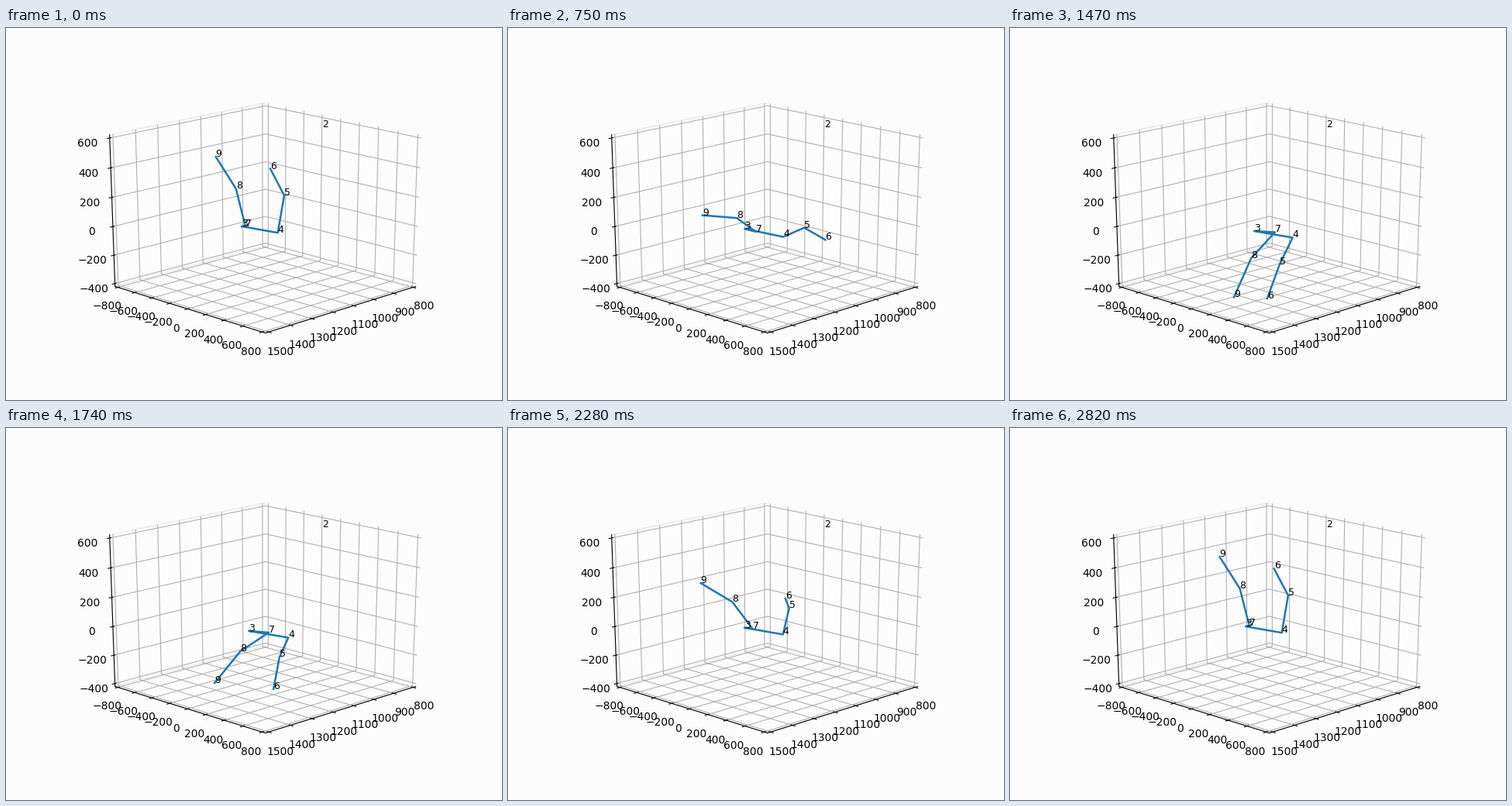
Recreate the animation shown at these times as a matplotlib script. Size 640x480 px, loop 2.85 s.

```python
import numpy as np
import matplotlib.pyplot as plt
from matplotlib.animation import FuncAnimation
from matplotlib.lines import Line2D
from matplotlib.transforms import Affine2D

W, H, DPI = 640, 480, 100
FRAMES, INTERVAL = 95, 30
PAPER = "#fcfcfc"

plt.rcParams["font.family"] = "DejaVu Sans"
plt.rcParams["axes3d.automargin"] = True

# Each joint, as x + yj on screen with y down:
# raised position, way to the lowered one, bulge of the arc,
# gap between the downward and the upward arc.
JOINTS = {
    6: (341 + 181.5j, -8 + 168j, 56 + 21j, 18 + 3j),
    5: (359 + 216j, -10.5 + 89j, 20.5 + 4j, 8 + 1.5j),
    4: (350.7 + 264.2j, 13.8 + 6.3j, 0.5 + 2.4j, -1.9 + 0.4j),
    3: (304 + 256j, 11 + 6j, -2.4 + 0.9j, -0.8 - 0.3j),
    7: (308.8 + 255.5j, 33 + 8j, -0.8 + 3.9j, -2 + 0.3j),
    8: (296.7 + 207.3j, 15 + 89.7j, -12 + 2j, 4.2 - 0.7j),
    9: (270.7 + 166.2j, 19.3 + 181.3j, -35.5 + 3j, 6.8 - 1.6j),
}


def swing_phase(k):
    """One swing per loop, lingering while the arms are raised."""
    t = 2 * np.pi * k / FRAMES
    return t - 0.3 * np.sin(t) - 0.2 * np.sin(2 * t)


def pose(k):
    a = swing_phase(k)
    lowered, side = (1 - np.cos(a)) / 2, np.sin(a)
    points = [start + way * lowered + bulge * side ** 2 + gap * side
              for start, way, bulge, gap in JOINTS.values()]
    return np.real(points), np.imag(points)


fig = plt.figure(figsize=(W / DPI, H / DPI), dpi=DPI, facecolor=PAPER)
ax = fig.add_subplot(projection="3d", facecolor="none")
ax.apply_aspect = lambda position=None: None  # fill the whole subplot area
ax.set_box_aspect((1, 1, 1), zoom=3 ** 0.5 / 1.8294640721620434)
ax.view_init(elev=20, azim=45)
ax.set(xticks=range(800, 1501, 100), yticks=range(-800, 801, 200),
       zticks=range(-400, 601, 200))
ax.set(xlim=(800, 1500), ylim=(-800, 800), zlim=(-400, 600))
for axis, edge in ((ax.xaxis, PAPER), (ax.yaxis, "#e9e9e9"), (ax.zaxis, "#eeeeee")):
    axis.pane.set(facecolor=PAPER, edgecolor=edge, alpha=1)

screen = Affine2D().scale(1, -1).translate(0, H)


def tag(joint, x=0, y=0):
    return fig.text(x, y, str(joint), fontsize=9, transform=screen)


tag(2, 408, 128.5)
tags = [tag(joint) for joint in JOINTS]
limbs = fig.add_artist(Line2D([], [], color="C0", lw=1.8, transform=screen))


def update(k):
    x, y = pose(k)
    limbs.set_data(x, y)
    for label, xy in zip(tags, zip(x, y)):
        label.set_position(xy)
    return [limbs, *tags]


anim = FuncAnimation(fig, update, frames=FRAMES, interval=INTERVAL,
                     repeat=True, repeat_delay=0, blit=False)
plt.show()
```
